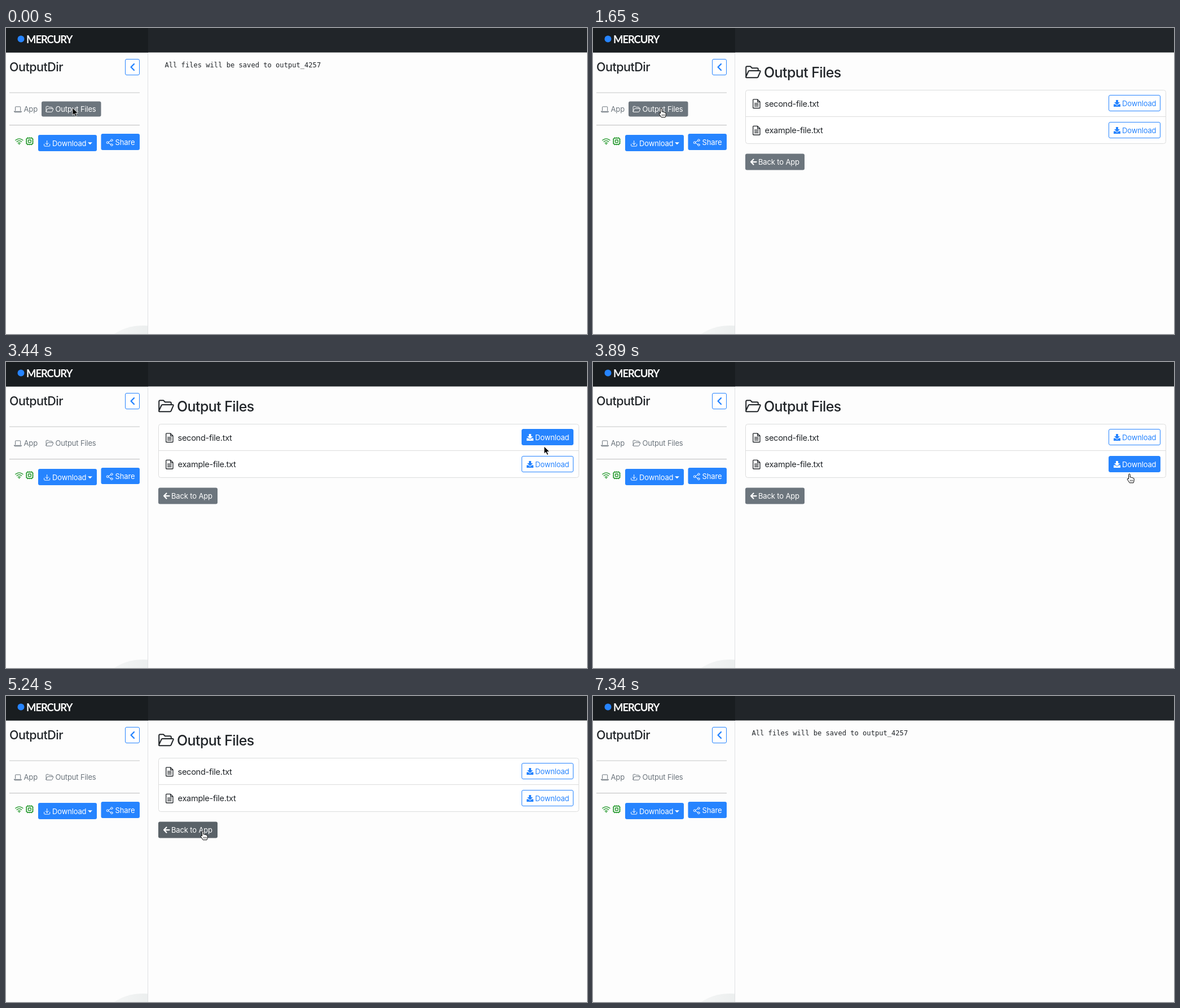
Recreate the animation shown at these times as an HTML page. Size 1030 by 544 pixels, loop 8.24 s.

```html
<!DOCTYPE html>
<html lang="en">
<head>
<meta charset="utf-8">
<title>Output files</title>
<style>
  html, body { margin: 0; width: 100%; height: 100%; overflow: hidden; background: #fdfdfd; }
  svg { display: block; width: 100vw; height: 100vh; --blue: #2684ff; --gray: #6c757d; }
  text { font: 13px Inter, sans-serif; letter-spacing: -.15px; fill: currentColor; }
  .body { font-size: 14.6px; letter-spacing: -.3px; }
  .title { font-size: 25px; font-weight: 500; letter-spacing: -.6px; }
  .name { font-size: 21.5px; font-weight: 500; letter-spacing: -.5px; }
  .mono { font: 12.1px "DejaVu Sans Mono", monospace; letter-spacing: 0; }
  .brand { font: 700 18.5px Lato, sans-serif; letter-spacing: -1.1px; }
  .line { fill: none; stroke: currentColor; stroke-linecap: round; stroke-linejoin: round; }
  .solid { fill: currentColor; }
  .dark { color: #212529; }
  .white { color: #fff; }
  .blue { color: var(--blue); }
  .gray { color: var(--gray); }
  .green { color: #16921f; }
  .outline { --face: #fff; color: var(--blue); }
  .outline.on { --face: var(--blue); color: #fff; }
  .tab { --face: none; color: var(--gray); }
  .tab.on { --face: var(--gray); color: #fff; }
  .back { --face: var(--gray); color: #fff; }
  .back.on { --face: #5a6268; }
</style>
</head>
<body>
<svg viewBox="0 0 1030 544">
  <defs>
    <linearGradient id="shade" x1="0" x2="1">
      <stop offset="0" stop-color="#f7f8f8"/><stop offset=".7" stop-color="#e9ecec"/>
    </linearGradient>
    <path id="folder" class="line" d="M.6 9.8V1.6q0-1 1-1h2.9l1.5 1.5h4.4q1 0 1 1v1.4M.6 9.8 2.8 5q.2-.5.8-.5h9.1q.9 0 .6.8l-2 4.7q-.3.6-.9.6H1.2q-.9 0-.6-.8"/>
    <g id="file">
      <path class="line" stroke-width="1.3" d="M.7 1.5q0-.8.8-.8H8.6L13 5.1V15.5q0 .8-.8.8H1.5q-.8 0-.8-.8zM8.6.9V5.1H13M3.6 7.7h6.4M3.6 10.2h6.4M3.6 12.7h6.4"/>
    </g>
    <g id="download">
      <rect x=".5" y=".5" width="91" height="28" rx="2.5" fill="var(--face)" stroke="var(--blue)"/>
      <path class="solid" d="M13 9h4v4h3l-5 5-5-5h3zM9 16.5h3l3 2.6 3-2.6h3v4.5H9z"/>
      <text x="24" y="19.6">Download</text>
    </g>
    <g id="backButton">
      <rect width="105" height="29" rx="3" fill="var(--face)"/>
      <path class="line" stroke-width="2.2" stroke-linecap="butt" d="M14.5 10l-4.5 4.6 4.5 4.6M10.5 14.6h9"/>
      <text x="23" y="19.5">Back to App</text>
    </g>
  </defs>

  <rect width="1030" height="544" fill="#fdfdfd"/>
  <ellipse cx="243" cy="585" rx="75" ry="56" fill="url(#shade)"/>
  <rect x="251" y="43" width="779" height="501" fill="#fdfdfd"/>
  <path d="M251.5 43V544" stroke="#dfe1e3"/>
  <rect width="1030" height="43.5" fill="#212529"/>
  <rect width="252" height="43.5" fill="#191d20"/>
  <circle cx="26.5" cy="19.5" r="6" fill="#2684ff"/>
  <text class="brand white" x="36" y="26.5">MERCURY</text>

  <text class="name dark" x="6" y="76.5">OutputDir</text>
  <g class="blue">
    <rect x="211.5" y="55.5" width="25" height="28" rx="2.5" fill="#fff" stroke="currentColor"/>
    <path class="line" stroke-width="2.4" stroke-linecap="butt" d="M227 64l-5.4 5.5 5.4 5.5"/>
  </g>
  <path d="M6 115H237M6 172.7H237" stroke="#c6c7c8" stroke-width="1.2"/>

  <g class="gray">
    <path class="line" d="M16.5 147V140.7q0-.8.8-.8h7.6q.8 0 .8.8V147M14.5 148.3h13.2q0 1.4-1.3 1.4H15.8q-1.3 0-1.3-1.4z"/>
    <text x="31.5" y="149">App</text>
  </g>
  <g id="tab" class="tab">
    <rect x="63" y="130.5" width="105.5" height="27" rx="3" fill="var(--face)"/>
    <use href="#folder" x="70.5" y="138.7"/>
    <text x="87.5" y="149">Output Files</text>
  </g>

  <g class="green">
    <path class="line" stroke-width="1.2" d="M16.8 199.5q6.6-5.4 13.2 0M19 202.2q4.4-3.6 8.8 0M21.2 204.7q2.2-1.8 4.4 0"/>
    <circle class="solid" cx="23.4" cy="206.3" r="1.1"/>
    <rect class="line" x="36.4" y="195.8" width="11" height="11" rx="2.2" stroke-width="1.5"/>
    <rect class="line" x="39.6" y="199" width="4.6" height="4.6" rx=".6" stroke-width="1.3"/>
    <path class="line" d="M38.6 194.5v1M41.9 194.5v1M45.2 194.5v1M38.6 207v1M41.9 207v1M45.2 207v1M35.1 198v0M35.1 201.3v0M35.1 204.6v0M48.7 198v0M48.7 201.3v0M48.7 204.6v0"/>
  </g>

  <g class="white">
    <rect x="57" y="190" width="104" height="29" rx="3" fill="var(--blue)"/>
    <path class="line" d="M67.7 206.5v2.6q0 1 1 1h8q1 0 1-1v-2.6M72.7 200.5v6.6M70 204.6l2.7 2.7 2.7-2.7"/>
    <text x="82" y="209.6">Download</text>
    <path class="solid" d="M145 203.2h8l-4 4z"/>
    <rect x="168.5" y="188" width="68.5" height="29" rx="3" fill="var(--blue)"/>
    <path class="line" d="M181.6 202.7l4.6-2.4M181.6 204.7l4.6 2.4"/>
    <g class="line">
      <circle cx="180" cy="203.7" r="1.8"/><circle cx="187.4" cy="199.6" r="1.8"/><circle cx="187.4" cy="207.8" r="1.8"/>
    </g>
    <text x="193.5" y="208">Share</text>
  </g>

  <text id="notebook" class="mono dark" x="281.5" y="70">All files will be saved to output_4257</text>

  <g id="files" class="dark">
    <use href="#folder" transform="translate(270 67) scale(2)"/>
    <text class="title" x="303" y="87.5">Output Files</text>
    <text id="loading" class="body" x="270" y="126.7">Loading files please wait ...</text>
    <g id="list">
      <rect x="270.5" y="110.5" width="745" height="95" rx="4" fill="#fff" stroke="#dcdddd"/>
      <path d="M271 157.5H1015" stroke="#dcdddd"/>
      <use href="#file" x="283" y="126.2"/>
      <text class="body" x="304.5" y="139.7">second-file.txt</text>
      <use href="#download" id="first" class="outline" x="914" y="119"/>
      <use href="#file" x="283" y="173.7"/>
      <text class="body" x="304.5" y="187.2">example-file.txt</text>
      <use href="#download" id="second" class="outline" x="914" y="167"/>
    </g>
    <use href="#backButton" id="back" class="back" x="270"/>
  </g>

  <g id="cursor">
    <path id="arrow" d="M0 0V13l3-2.7 2.3 5 2.2-1-2.2-4.8h4.2z" stroke="#fff" stroke-width=".8"/>
    <g id="hand" fill="#fff" stroke="#000" stroke-linejoin="round">
      <path d="M-1.4 9V1.3a1.3 1.3 0 0 1 2.6 0V6q1.8-.8 2.6.6 1.7-.6 2.4.8 2-.4 2 1.4v2.5q0 2-1.2 4.5H.2q-1.7-2.8-3.7-5.6-.9-1.6.4-2 1-.2 1.7.8z"/>
      <path d="M1.4 10.5v2.8M3.6 10.5v2.8M5.8 10.5v2.8" stroke-width=".8"/>
    </g>
  </g>
</svg>
<script>
const LOOP = 8240;
const el = id => document.getElementById(id);
const show = (id, visible) => { el(id).style.display = visible ? '' : 'none'; };

// The pointer jumps to each spot: time, x, y
const spots = [
  [0, 118, 142], [300, 120, 143], [450, 121, 143],
  [2100, 340, 146], [2250, 700, 148], [2400, 878, 149],
  [2700, 903, 147], [2850, 934, 143], [3000, 951, 136], [3140, 955, 134],
  [3440, 954, 150], [3590, 953, 166], [3740, 952, 182], [3890, 951, 199], [4040, 951, 190], [4190, 951, 184],
  [4640, 734, 215], [4790, 500, 231], [4940, 382, 237], [5090, 355, 239], [5240, 349, 240],
  [6140, 377, 246], [6290, 723, 303], [6440, 828, 366], [6590, 891, 479],
  [6890, 931, 508], [7040, 930, 523], [7190, 929, 536], [7340, 929, 560]
];

function draw(t) {
  const during = (from, to) => t >= from && t < to;
  const loading = during(1050, 1650), list = during(1650, 5690);
  show('notebook', !loading && !list);
  show('files', loading || list);
  show('loading', loading);
  show('list', list);
  el('back').setAttribute('y', loading ? 166 : 223.5);

  el('tab').classList.toggle('on', t < 2250);
  el('first').classList.toggle('on', during(3000, 3590));
  el('second').classList.toggle('on', during(3740, 4790));
  el('back').classList.toggle('on', during(5090, 5690));

  const [, x, y] = spots.findLast(([start]) => t >= start);
  el('cursor').setAttribute('transform', `translate(${x} ${y})`);
  const pointing = during(300, 2100) || during(3000, 3440) || during(3740, 4640) || during(5090, 6140);
  show('hand', pointing);
  show('arrow', !pointing);
}

function tick() {
  draw(performance.now() % LOOP);
  requestAnimationFrame(tick);
}
tick();
</script>
</body>
</html>
```
